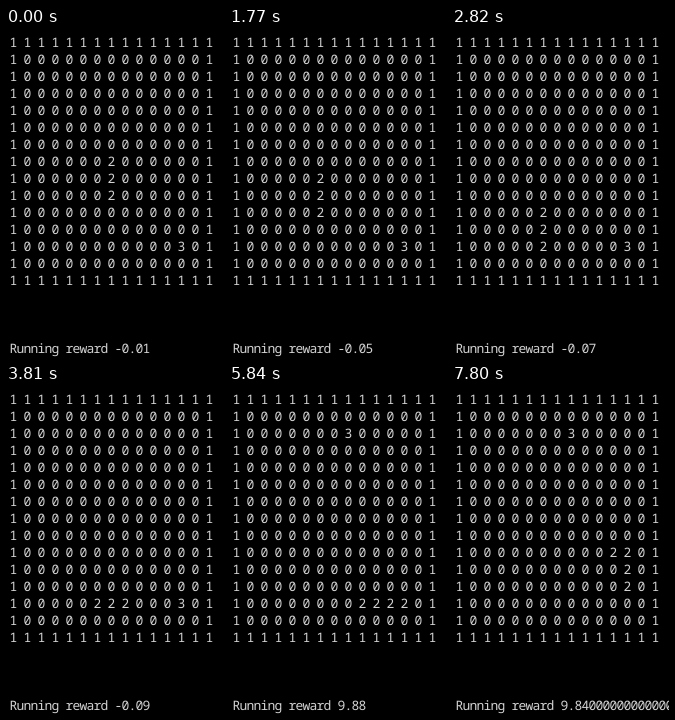
These frames come from a looping animation (217x329 px, 8 s). An HTML page:

```html
<!DOCTYPE html>
<html lang="en">
<head>
<meta charset="utf-8">
<title>Snake</title>
<style>
html, body { margin: 0; width: 100%; height: 100%; overflow: hidden; background: #000; }
svg { display: block; width: 217px; height: 329px; }
text {
  font: 13px "Noto Sans Mono", "DejaVu Sans Mono", monospace;
  letter-spacing: -0.8px;
  fill: #d2d2d2;
  white-space: pre;
  text-rendering: geometricPrecision;
}
</style>
</head>
<body>
<svg id="stage" viewBox="0 0 217 329"></svg>
<script>
const SIZE = 15, LINE = 17, LEFT = 3.6, BASE = 19, LOOP = 8000;
const STEPS = [0, 240, 780, 1320, 1770, 2310, 2820, 3300, 3810, 4320,
  4820, 5330, 5840, 6370, 6840, 7380, 7800];
const MOVES = "LDDDDDRRRRRRUUUL";
const DIRS = { L: [-1, 0], R: [1, 0], U: [0, -1], D: [0, 1] };

const stage = document.getElementById("stage");

function addLine(row) {
  const el = document.createElementNS("http://www.w3.org/2000/svg", "text");
  el.setAttribute("x", LEFT);
  el.setAttribute("y", BASE + row * LINE);
  return stage.appendChild(el);
}

const rows = Array.from({ length: SIZE }, (_, r) => addLine(r));
const status = addLine(18);

function draw(snake, food) {
  const grid = Array.from({ length: SIZE }, (_, r) =>
    Array.from({ length: SIZE }, (_, c) =>
      r % (SIZE - 1) && c % (SIZE - 1) ? 0 : 1));
  grid[food[1]][food[0]] = 3;
  for (const [c, r] of snake) grid[r][c] = 2;
  return grid.map(line => line.join(" "));
}

// Play the game once; the reward printed is always one move ahead of the board.
function play() {
  let snake = [[7, 7], [7, 8], [7, 9]], food = [12, 12], reward = 0;
  return STEPS.map((_, i) => {
    const next = DIRS[MOVES[i]] || [0, 0];
    const [c, r] = snake[0];
    const head = [c + next[0], r + next[1]];
    const eats = head[0] === food[0] && head[1] === food[1];
    reward += eats ? 10 : -0.01;
    const state = { lines: draw(snake, food), text: "Running reward " + reward };
    snake = [head, ...(eats ? snake : snake.slice(0, -1))];
    if (eats) food = [8, 2];
    return state;
  });
}

const states = play();
let shown = -1;

function show(t) {
  const i = STEPS.filter(s => s <= t).length - 1;
  if (i === shown) return;
  shown = i;
  rows.forEach((el, r) => { el.textContent = states[i].lines[r]; });
  status.textContent = states[i].text;
}

const start = performance.now();
function tick() {
  show((performance.now() - start) % LOOP);
  requestAnimationFrame(tick);
}
tick();
</script>
</body>
</html>
```
